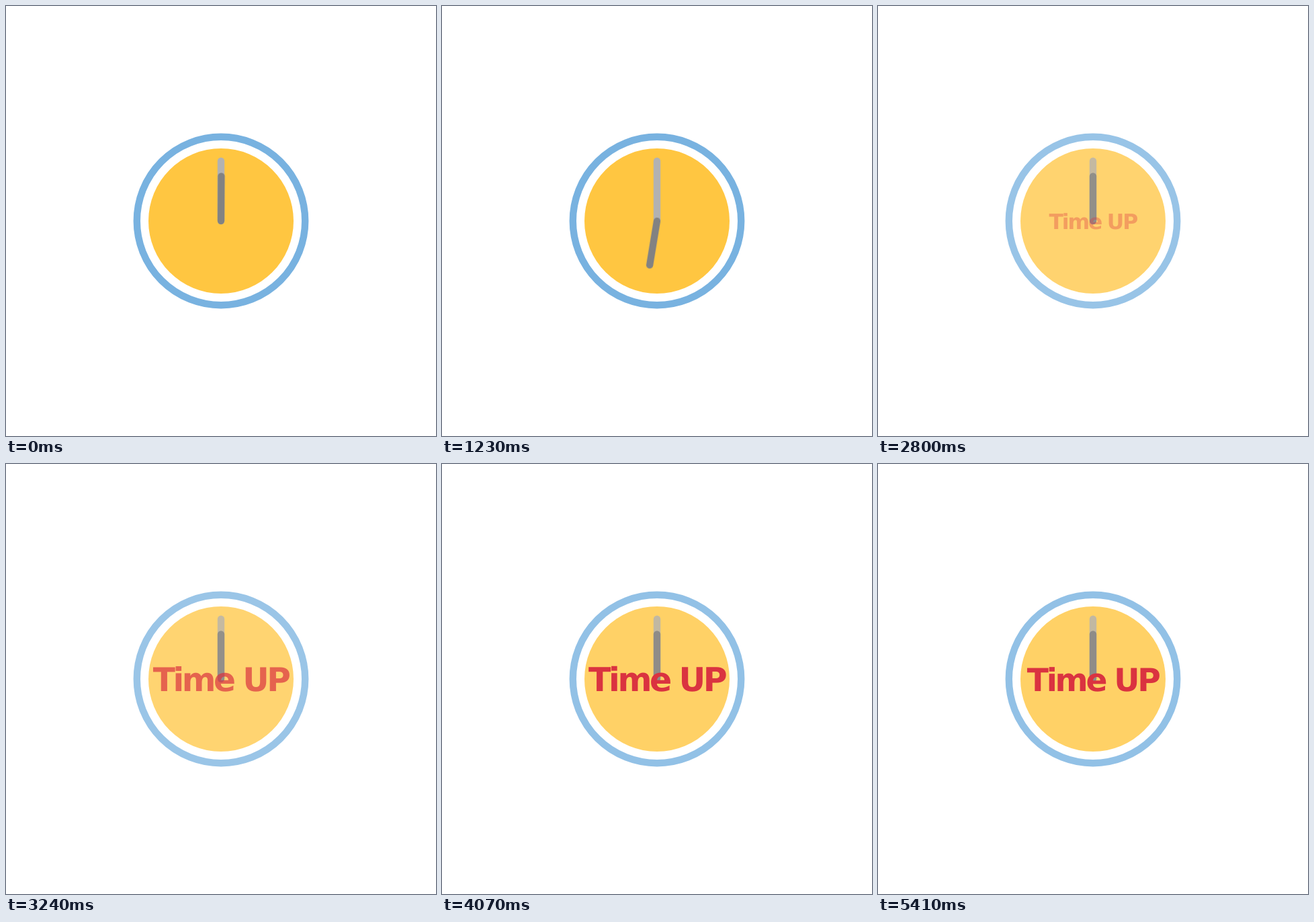
Write an HTML page that moves like this. It is 640x640 px and loops after 6.1 s.

```html
<!DOCTYPE html>
<html lang="en">
<head>
<meta charset="utf-8">
<title>Time UP</title>
<style>
  html, body { margin: 0; height: 100%; overflow: hidden; background: #fff; }
  svg { display: block; width: 100%; height: 100%; }

  .fade { animation: fade 6.1s linear infinite; }
  .hand { stroke-width: 10.4; stroke-linecap: round; }
  .sweep { animation: sweep 6.1s -50ms infinite; }
  .message {
    font: bold 47.2px "DejaVu Sans", sans-serif;
    letter-spacing: -.07em;
    font-kerning: none;
    text-rendering: geometricPrecision;
    fill: #da3340;
    animation: appear 6.1s linear infinite, pulse 6.1s linear infinite;
  }

  @keyframes sweep {
    0% { transform: rotate(0deg); animation-timing-function: cubic-bezier(.37, 0, .63, 1); }
    40.66%, 100% { transform: rotate(360deg); }
  }
  @keyframes fade {
    0%, 39.34% { opacity: 1; }
    47.54% { opacity: .7; }
    59.1%, 100% { opacity: .8; }
  }
  @keyframes appear {
    0%, 39.34% { opacity: 0; }
    59.02%, 100% { opacity: 1; }
  }
  @keyframes pulse {
    0%, 39.34% { transform: scale(.333); }
    59.1%, 78.77% { transform: scale(1.333); animation-timing-function: cubic-bezier(.37, 0, .63, 1); }
    68.93% { transform: scale(1); animation-timing-function: cubic-bezier(.37, 0, .63, 1); }
    88.61%, 100% { transform: scale(1); }
  }
</style>
</head>
<body>
<svg viewBox="0 0 640 640">
  <g transform="translate(320 320)">
    <circle class="fade" r="125.2" fill="none" stroke="#78b2e0" stroke-width="10.4"/>
    <circle class="fade" r="108" fill="#ffc641"/>
    <line class="hand fade" y1="-.2" y2="-89.2" stroke="#b2b2b2"/>
    <g class="sweep">
      <line class="hand fade" y1="-.2" y2="-66.5" stroke="#828282"/>
    </g>
    <g transform="translate(0 .4)">
      <text class="message" x="-98.2" y="17.2">Time UP</text>
    </g>
  </g>
</svg>
</body>
</html>
```
